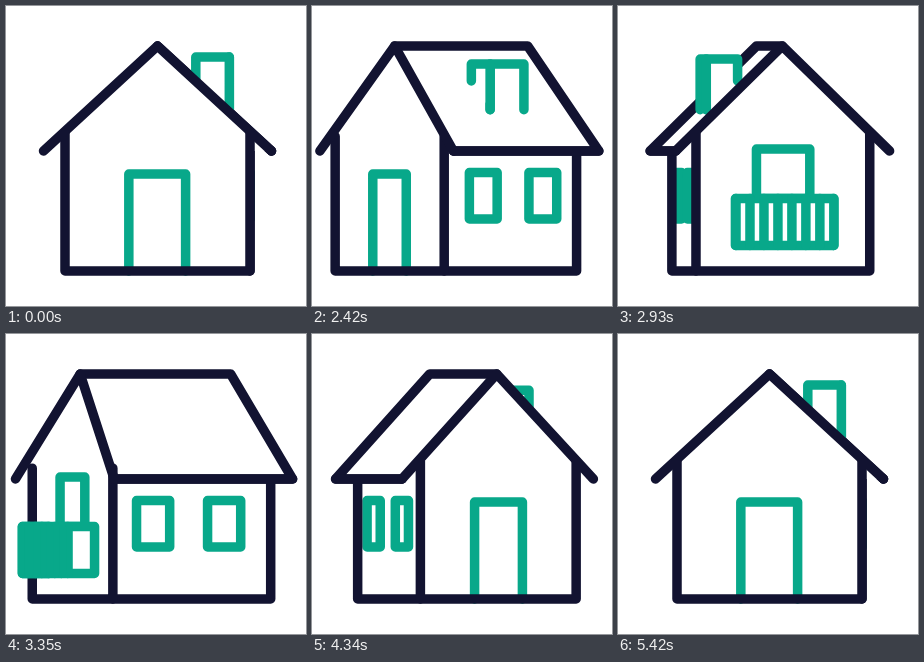
These frames come from a looping animation (300x300 px, 5450 ms). An HTML page with a canvas:

```html
<!DOCTYPE html>
<html>
<head>
<meta charset="utf-8">
<style>
html, body { margin: 0; width: 100%; height: 100%; overflow: hidden; background: #fff }
canvas { display: block; width: 100vw; height: 100vh }
</style>
</head>
<body>
<canvas id="stage" width="300" height="300"></canvas>
<script>
const ctx = document.getElementById('stage').getContext('2d');
const NAVY = '#121331', GREEN = '#08a88a';
const LOOP = 5450, HOLD = 2030, STEP = 30, TURN = 3420;
const RIDGE = 40, EAVE = 145, BASE = 265;

// Horizontal positions in three poses: facing, corner on, side on.
// Near end: eave, wall, apex, wall, eave. Far end: eave, wall, apex.
const POSES = [
  [-114, -92.5, 0, 92.5, 114, -114, -92.5, 0],
  [-20, -4, 60, 129.5, 143.5, -137, -114.5, -58],
  [136, 115, 100, 115, 136, -136, -115, -100]
];

const mix = (a, b, k) => a + (b - a) * k;

function ease(x) {
  let lo = 0, hi = 1, s = x;
  for (let i = 0; i < 30; i++) {
    const r = 1 - s;
    if (3 * s * r * r * .18 + 3 * s * s * r * .25 + s ** 3 < x) lo = s; else hi = s;
    s = (lo + hi) / 2;
  }
  return s * s * (3 - 2 * s);
}

function angleAt(time) {
  const t = time % LOOP;
  if (t < HOLD) return 0;
  const progress = (Math.floor((t - HOLD) / STEP) + 1) * STEP / TURN;
  return progress < 1 ? 360 * ease(progress) : 0;
}

function drawHouse(angle) {
  const frontNear = angle < 90 || angle >= 270;
  const chimneySide = angle < 180;
  const dir = angle % 180 < 90 ? -1 : 1;
  const turn = Math.min(angle % 180, 180 - angle % 180) / 45;
  const leg = turn < 1 ? 0 : 1;
  const [eaveL, wallL, apex, wallR, eaveR, farEave, farWall, farApex] =
    POSES[leg].map((v, i) => mix(v, POSES[leg + 1][i], turn - leg));
  const centre = 150 + 1.5 * Math.max(0, 1 - turn);
  const wallTop = 127 + 18 * Math.max(0, turn - 1);
  const depth = apex - farApex;
  const width = wallR - wallL;
  const jut = Math.max(0, depth - 23) * .21;

  function path(points, stroke, fill) {
    ctx.beginPath();
    for (const [x, y] of points) ctx.lineTo(centre + dir * x, y);
    if (fill) ctx.fill();
    if (stroke) {
      ctx.strokeStyle = stroke;
      ctx.stroke();
    }
  }

  const box = (x1, y1, x2, y2, stroke) =>
    path([[x1, y1], [x2, y1], [x2, y2], [x1, y2], [x1, y1]], stroke, true);

  function chimney() {
    const top = 51 + Math.min(7, depth * .08);
    const foot = (slope, back) => {
      const near = mix(apex, chimneySide ? eaveL : eaveR, slope);
      const far = mix(farApex, chimneySide ? farEave : -eaveL, slope);
      return [mix(near, far, frontNear ? back : 1 - back), mix(RIDGE + 2, EAVE - 5, slope)];
    };
    const face = (a, b) => path([a, [a[0], top], [b[0], top], b], GREEN, true);
    const [near, far] = frontNear ? [.415, .655] : [.655, .415];
    const edge = chimneySide ? .63 : .336;
    face(foot(edge, near), foot(edge, far));
    face(foot(.336, near), foot(.63, near));
  }

  function balcony(wall, out) {
    const x1 = wall + width * .227, x2 = wall + width * .79;
    box(x2, 192.5, x2 + out, 239.5, GREEN);
    box(x1, 192.5, x1 + out, 239.5, GREEN);
    box(x1 + out, 192.5, x2 + out, 239.5, GREEN);
    for (let i = 1; i < 7; i++) {
      const x = mix(x1, x2, i / 7) + out;
      path([[x, 192.5], [x, 239.5]], GREEN);
    }
  }

  if (frontNear) balcony(farWall, -jut);
  if (!chimneySide) chimney();

  // Long side and its roof
  box(farWall, EAVE, wallL, BASE);
  const along = k => mix(wallL, farWall, frontNear ? k : 1 - k);
  box(along(.19), 166.5, along(.4), 213, GREEN);
  box(along(.64), 166.5, along(.85), 213, GREEN);
  path([[farWall, EAVE], [farWall, BASE], [wallL, BASE]], NAVY);
  path([[apex, RIDGE], [farApex, RIDGE], [farEave, EAVE], [eaveL, EAVE]], NAVY, true);
  if (chimneySide) chimney();

  // Gable end
  const gable = [[eaveL, EAVE], [apex, RIDGE], [eaveR, EAVE]];
  path(gable, null, true);
  box(wallL, wallTop, wallR, BASE);
  const openL = wallL + width * .348, openR = wallL + width * .655;
  if (frontNear) path([[openL, BASE], [openL, 168], [openR, 168], [openR, BASE]], GREEN);
  else box(openL, 143, openR, 192.5, GREEN);
  path([[wallL, wallTop], [wallL, BASE], [wallR, BASE], [wallR, wallTop]], NAVY);
  path([[farEave, EAVE], [eaveL, EAVE]], NAVY);
  path(gable, NAVY);
  if (!frontNear) balcony(wallL, jut);
}

const start = performance.now();

function draw() {
  ctx.fillStyle = '#fff';
  ctx.fillRect(0, 0, 300, 300);
  ctx.lineWidth = 9.5;
  ctx.lineCap = ctx.lineJoin = 'round';
  drawHouse(angleAt(performance.now() - start));
  requestAnimationFrame(draw);
}
draw();
</script>
</body>
</html>
```
